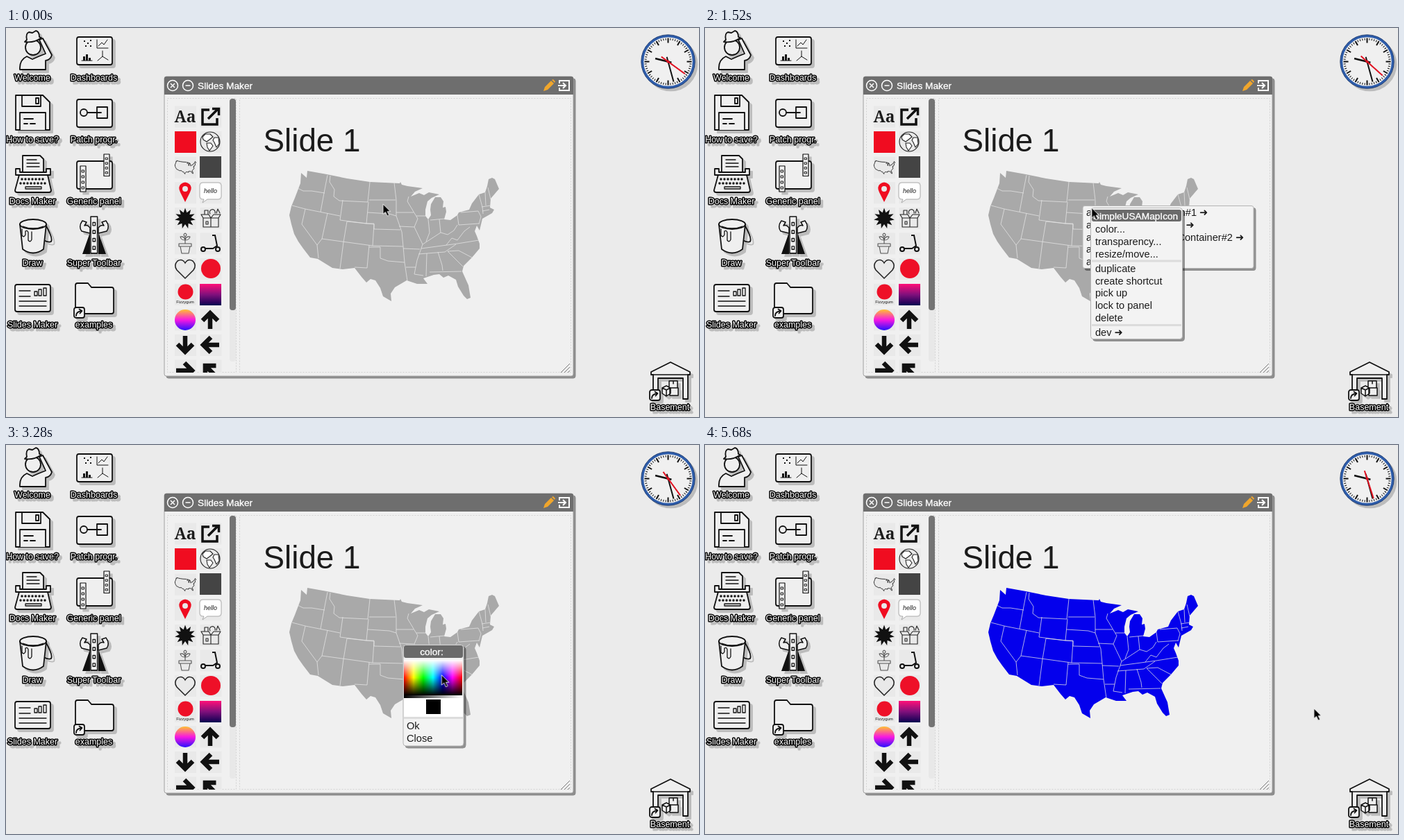
Recreate the animation shown at these times as an HTML page. Size 998x561 px, loop 5760 ms.

```html
<!DOCTYPE html>
<html lang="en">
<head>
<meta charset="utf-8">
<title>Slides Maker</title>
<style>
html, body { margin: 0; width: 100%; height: 100%; overflow: hidden; background: #ebebeb; }
svg { display: block; width: 998px; height: 561px; font-family: "Liberation Sans", Arial, sans-serif; }
text { fill: #1b1b1b; white-space: pre; }
.shadow { filter: drop-shadow(4px 4px 0 #0003); }
.pop { filter: drop-shadow(3.5px 3.5px 0 #0006); }
.ink { fill: #efefef; stroke: #111; stroke-width: 1.8; stroke-linejoin: round; stroke-linecap: round; }
.thin { fill: none; stroke: #222; stroke-width: 1.1; stroke-linejoin: round; stroke-linecap: round; }
.solid { fill: #111; stroke: none; }
.line { fill: none; }
.label { font-size: 12.5px; text-anchor: middle; fill: #fff; stroke: #000; stroke-width: 3px; paint-order: stroke; stroke-linejoin: round; }
.head { font-size: 13.7px; fill: #fff; stroke: #fff; stroke-width: .35px; }
.item { font-size: 14.6px; }
.arrow { fill: none; stroke: #111; stroke-width: 6.5; }
.dots { fill: none; stroke: #d2d2d2; stroke-dasharray: 2 2; }
.box { fill: #f3f3f3; stroke: #b4b4b4; }

.states, .list, .hover1, .props, .hover2, .picker, .picked, .hover3, .press, .ring, .second {
  animation: 5.76s step-end infinite;
}
.cursor { animation: move 5.76s ease-in-out infinite; }
.list { animation-name: list; }
.hover1 { animation-name: hover1; }
.props { animation-name: props; }
.hover2 { animation-name: hover2; }
.picker { animation-name: picker; }
.picked { animation-name: picked; }
.hover3 { animation-name: hover3; }
.press { animation-name: press; }
.ring { animation-name: ring; }
.states { animation-name: paint; }
.second { animation-name: tick; }

@keyframes list { 0%, 43.05%, 100% { opacity: 0 } 6.94% { opacity: 1 } }
@keyframes hover1 { 0%, 26.38%, 100% { opacity: 0 } 15.27% { opacity: 1 } }
@keyframes props { 0%, 43.05%, 100% { opacity: 0 } 22.22% { opacity: 1 } }
@keyframes hover2 { 0%, 43.05%, 100% { opacity: 0 } 36.11% { opacity: 1 } }
@keyframes picker { 0%, 86.11%, 100% { opacity: 0 } 43.05% { opacity: 1 } }
@keyframes picked { 0% { fill: #000 } 62.5%, 100% { fill: #0400ec } }
@keyframes hover3 { 0%, 86.11%, 100% { opacity: 0 } 77.77% { opacity: 1 } }
@keyframes press { 0%, 86.11%, 100% { opacity: 0 } 81.94% { opacity: 1 } }
@keyframes paint { 0% { fill: #a9a9a9 } 86.11%, 100% { fill: #0400ec } }
@keyframes ring {
  0%, 8.33%, 23.61%, 43.05%, 65.27%, 87.5%, 100% { opacity: 0 }
  4.16%, 19.44%, 38.88%, 61.11%, 83.33% { opacity: 1 }
}
@keyframes move {
  0%, 11.11% { transform: translate(543px, 254px) }
  18.05%, 25% { transform: translate(556px, 258px) }
  31.94%, 33.34% { transform: translate(567px, 275px) }
  37.5%, 47.22% { transform: translate(573px, 286px) }
  58.33%, 70.83% { transform: translate(629px, 333px) }
  79.16%, 88.88% { transform: translate(610px, 399px) }
  97.22%, 100% { transform: translate(877px, 380px) }
}
@keyframes tick {
  0% { transform: rotate(126deg) }
  11.46% { transform: rotate(132deg) }
  28.82% { transform: rotate(138deg) }
  46.18% { transform: rotate(144deg) }
  63.54% { transform: rotate(150deg) }
  80.9% { transform: rotate(156deg) }
  98.26%, 100% { transform: rotate(162deg) }
}
</style>
</head>
<body>
<svg viewBox="0 0 998 561">
<defs>
  <path id="land" d="M434 206L433 216L425 209L424 224L416 245L411 257L408 270L411 283L415 297L421 308L428 318L438 331L449 333L470 346L485 348L502 346L512 359L519 367L525 362L532 364L539 375L543 387L555 394L554 383L560 374L577 364L592 369L607 369L601 361L616 356L624 355L630 360L637 357L648 363L651 373L659 386L664 391L669 389L666 371L657 351L659 343L671 331L682 318L682 311L678 300L675 293L678 285L682 292L686 275L700 267L703 262L697 259L698 246L710 232L704 218L700 216L695 218L693 228L690 237L681 240L671 253L667 262L652 266L650 270L640 277L631 276L634 265L633 258L629 259L630 250L626 244L618 244L612 254L611 262L612 270L608 276L604 271L604 262L607 250L613 245L624 240L609 237L602 241L595 238L583 243L589 236L600 231L578 228L570 226L568 222L567 224L524 222L491 217L462 211Z"/>
  <linearGradient id="hue"></linearGradient>
  <linearGradient id="light" x2="0" y2="1">
    <stop stop-color="#fff"/><stop offset=".5" stop-color="#fff" stop-opacity="0"/>
    <stop offset=".5" stop-color="#000" stop-opacity="0"/><stop offset="1"/>
  </linearGradient>
  <linearGradient id="gray"><stop/><stop offset="1" stop-color="#fff"/></linearGradient>
  <linearGradient id="dusk" x2="0" y2="1"><stop stop-color="#ff0f78"/><stop offset=".5" stop-color="#80107c"/><stop offset="1" stop-color="#0a0050"/></linearGradient>
  <linearGradient id="dawn" x2="0" y2="1"><stop stop-color="#ffc030"/><stop offset=".5" stop-color="#f818e0"/><stop offset="1" stop-color="#2810ff"/></linearGradient>
  <clipPath id="tools"><path d="M232 101H336V497H232Z"/></clipPath>
  <g id="badge"><rect width="15" height="15" rx="3" class="ink"/><path class="ink line" d="M3 12Q3 6 11 5M7.500 2.500L11.500 5L8.500 8.500"/></g>
  <g id="strip"><rect width="8" height="37" class="ink" style="stroke-width:1.2"/><path class="ink line" style="stroke-width:1" d="M2.500 6h3v3h-3zM2.500 14h3v3h-3zM2.500 22h3v3h-3zM2.500 30h3v3h-3z"/></g>
</defs>
<rect width="998" height="561" fill="#ebebeb"/>

<g class="ink">
  <g class="shadow">
    <path d="M20 60Q19 46 30 41L38 45L47 41L57 37L48 17L53 15L66 39Q64 46 57 47V60Z"/>
    <circle cx="39" cy="28" r="11"/>
    <path d="M30 17Q28 8 33 6L38 7L43 4Q48 5 48 13L51 14Q40 22 27 20Z"/>
  </g>
  <g class="shadow">
    <rect x="102" y="13" width="51" height="40" rx="3"/>
    <path class="line" style="stroke-width:1" d="M131 17V29H147M133 26L138 21L141 24L146 17M109 47H124M139 33V41L132 47M139 41L147 46"/>
    <path class="solid" d="M111 41h3v6h-3zM115 38h3v9h-3zM119 43h3v4h-3zM112 18h2v2h-2zM117 21h2v2h-2zM121 17h2v2h-2zM114 25h2v2h-2zM121 25h2v2h-2z"/>
  </g>
  <g class="shadow">
    <path d="M14 97H53L63 107V147H14Z"/>
    <path d="M23 97H50V113H23ZM43 101H47V109H43ZM20 147V122H57V147"/><path class="line" d="M26 131H39M26 138H31M35 138H42"/>
  </g>
  <g class="shadow">
    <rect x="102" y="103" width="51" height="40" rx="3"/>
    <circle cx="112" cy="122" r="5"/><path d="M131 114H146V130H131ZM117 122H137"/>
  </g>
  <g class="shadow">
    <path d="M24 184H49L54 189V210H24Z"/>
    <path class="line" stroke-width="1.300" d="M30 190H44M30 195H48M30 200H48"/>
    <path d="M14 203H20V208H58V203H64V212H14ZM19 212H60L65 234Q65 237 62 237H16Q13 237 13 234Z"/>
    <path class="line" stroke-dasharray="0 5" stroke-width="3.400" d="M23 218H58M21 224H60"/><path stroke-width="1.300" d="M28 229H51V232H28Z"/>
  </g>
  <g class="shadow">
    <rect x="102" y="192" width="51" height="40" rx="3"/>
    <use href="#strip" x="107" y="199"/><use href="#strip" transform="translate(141 182) scale(1 .85)"/>
  </g>
  <g class="shadow">
    <path class="line" d="M57 284Q68 303 65 308Q59 311 40 297"/>
    <path d="M20 283L24 319Q39 330 54 319L58 283Z"/><ellipse cx="39" cy="283" rx="19" ry="7"/>
    <path class="line" stroke-width="1.300" d="M24 286Q39 292 54 286M23 290V299Q26 303 28 298V293Q31 291 32 295V306Q35 310 37 305V294"/>
  </g>
  <g class="shadow">
    <path class="solid" d="M121 295L110 326H121ZM133 295L144 326H133Z"/>
    <path stroke-width="1.500" d="M121 296L109 293Q104 286 110 278L116 280L113 285Q117 283 121 288ZM133 296L145 293Q150 286 144 278L138 280L141 285Q137 283 133 288Z"/>
    <use href="#strip" transform="translate(122 272) scale(1.200 1.430)"/>
  </g>
  <g class="shadow">
    <rect x="13" y="370" width="51" height="39" rx="3"/>
    <path class="line" stroke-width="1.300" d="M19 379H35M19 387H35M19 394H58M19 401H58M41 380h4v6h-4zM47 377h4v9h-4zM54 375h4v11h-4z"/>
  </g>
  <g class="shadow">
    <path d="M100 412V371Q100 368 103 368H118L123 374H152Q155 374 155 377V409Q155 412 152 412Z"/><use href="#badge" x="98" y="403"/>
  </g>
  <g class="shadow">
    <path d="M932 535V500H929V496L957 482L985 496V500H982V535H975V505H939V535Z"/>
    <path stroke-width="1.500" d="M932 500H982M955 509h12v10h-12zM961 509v4M956 519h12v11h-12zM945 519l6-3 6 3v8l-6 4-6-4zM945 519l6 3 6-3M951 522v9"/><use href="#badge" x="927" y="522"/>
  </g>
</g>
<g id="labels"></g>

<g transform="translate(953.500 48.500)">
  <g class="shadow"><circle r="37" fill="#f0f0f0" stroke="#2d5caa" stroke-width="3.500"/></g>
  <circle r="38.800" fill="none" stroke="#1c3565" stroke-width=".8"/>
  <g id="ticks" stroke="#111"></g>
  <path stroke="#111" stroke-width="2.500" transform="rotate(283.700)" d="M0 5V-19"/>
  <path stroke="#111" stroke-width="2" transform="rotate(164.600)" d="M0 7V-30"/>
  <g class="second"><path stroke="#e01020" stroke-width="2" d="M0 12V-30"/><circle r="2" fill="#e01020"/></g>
</g>

<g class="pop"><rect x="228" y="70" width="589" height="432" rx="3" fill="#f0f0f0" stroke="#a0a0a0"/></g>
<path d="M228 96V73Q228 70 231 70H814Q817 70 817 73V96Z" fill="#6e6e6e"/>
<g fill="none" stroke="#fff" stroke-width="1.500">
  <circle cx="240" cy="83" r="7.500"/><circle cx="262" cy="83" r="7.500"/>
  <path d="M237 80L243 86M243 80L237 86M258.500 83H265.500"/>
  <path stroke-width="2" d="M797 80V76H811V90H797V86M795 83H806M802 79L806 83L802 87"/>
</g>
<path fill="#f0a62c" d="M774 91L776 85L785 76L789 80L780 89ZM786 75L788 74L791 77L790 79Z"/>
<text class="head" x="276" y="88">Slides Maker</text>
<path class="dots" d="M232.500 101.500H331.500V496.500H232.500ZM336.500 101.500H813.500V496.500H336.500Z"/>
<rect x="322" y="102" width="9" height="379" rx="4" fill="#e8e8e8"/>
<rect x="322" y="102" width="9" height="305" rx="4" fill="#747474"/>
<path stroke="#777" d="M799 497L812 484M804 497L812 489M809 497L812 494"/>

<g clip-path="url(#tools)">
  <g id="cells" fill="#e9e9e9"></g>
  <text x="258" y="136" font-size="23" font-weight="700" text-anchor="middle" font-family="Noto Serif, serif">Aa</text>
  <path fill="none" stroke="#111" stroke-width="3.500" d="M293 118H283V139H304V130M291 131L305 117M297 116.500H306.500V126"/>
  <rect x="243" y="149" width="31" height="31" fill="#f00c20"/>
  <g class="thin">
    <circle cx="294" cy="164" r="14"/>
    <path fill="#fff" d="M283 157L287 153L294 153L298 157L293 161L289 164L284 161ZM289 166L295 166L298 170L293 177L290 172ZM300 158L306 158L307 167L303 172L300 165L298 162Z"/>
    <use href="#land" transform="translate(202.500 171) scale(.1)" stroke-width="9"/>
  </g>
  <rect x="279" y="185" width="31" height="31" fill="#444"/>
  <path fill="#f00c20" fill-rule="evenodd" d="M258 251L251 237Q247 229 252 225Q258 220 264 225Q269 229 265 237ZM258 228A4 4 0 1 0 258 236A4 4 0 1 0 258 228Z"/>
  <path fill="#fff" stroke="#aaa" d="M283 223H306Q310 223 310 227V243Q310 247 306 247H290L283 252L285 247H283Q279 247 279 243V227Q279 223 283 223Z"/>
  <text x="294.500" y="238" font-size="9" font-style="italic" text-anchor="middle">hello</text>
  <polygon id="burst" fill="#111"/>
  <g class="thin">
    <path d="M284 274H306V287H284ZM284 274L281 269H292L295 274L299 269H309L306 274M295 274V287M286 268V263H291V268M294 268A4 4 0 1 1 301 267M303 267L305 261L308 267M288 279H291V283H288Z"/>
    <path stroke="#555" d="M249 311H267V315H249ZM251 315L253 325H263L265 315M258 311V301M258 306Q252 306 251 301Q257 300 258 306Q259 300 265 301Q264 306 258 306M258 301Q254 298 258 296Q262 298 258 301"/>
  </g>
  <g fill="none" stroke="#111" stroke-width="2"><circle cx="284" cy="319" r="3"/><circle cx="305" cy="319" r="3"/><path d="M287 318H298L304 314L301 299H297"/></g>
  <path fill="none" stroke="#222" stroke-width="1.500" d="M258 361L246 349Q241 342 247 336Q254 332 258 339Q262 332 269 336Q275 342 270 349Z"/>
  <circle cx="295" cy="347" r="14" fill="#ee1028"/>
  <circle cx="258.500" cy="380.500" r="11" fill="#ee1028"/>
  <text x="258" y="397" font-size="6" text-anchor="middle">Fizzygum</text>
  <rect x="279" y="369" width="31" height="31" fill="url(#dusk)"/>
  <circle cx="258" cy="421" r="15" fill="url(#dawn)"/>
  <g id="arrows"></g>
</g>

<text x="370.500" y="178" font-size="45.800">Slide 1</text>
<use href="#land" class="states"/>
<g fill="none" stroke="#e6e6e6" stroke-width=".75">
  <path d="M420 231L428 235L440 235L459 238M463 212L458 238L453 265M412 256L431 261L481 271M467 213L466 222L473 233L472 243L480 249L521 251L524 222M485 248L481 277L519 282L522 251M431 261L426 283L448 313L450 332M463 267L455 304L528 314L530 283L491 279L486 309L481 347M455 304L448 313M519 282H530V290L568 291M523 313L520 346L502 345M523 316H539V332L550 336L574 338M528 314L572 315M523 248H561M521 266L552 268L562 271"/>
  <path d="M559 223L562 248V271L570 294L572 315L574 338L578 365M562 266H587M580 243L578 250L593 275L588 287L600 312L592 335L590 345L588 355L601 357M566 286L588 287M572 318L596 319M576 345H590M591 271H604M608 276L610 295L605 308M624 276L626 295M600 312L626 295L636 298L645 292L650 284M650 270L652 284"/>
  <path d="M598 318L650 311L681 306M594 326L632 323L648 312M606 325L605 358M622 323L628 342L629 350M610 352L656 351M636 322L658 344M636 322L652 321L671 331M634 313L642 303L650 306L660 293L668 287M652 284L681 282M655 266L680 264L684 272L681 283M681 240L686 258L687 268M690 237L691 256M685 258L698 256M686 264L696 262M694 230L698 247M611 277L632 275"/>
</g>

<g class="list">
  <g class="pop"><rect class="box" x="544" y="256.500" width="246" height="90" rx="3"/></g>
  <rect class="hover1" x="545" y="257" width="244" height="17" fill="#a9a9a9"/>
  <g id="listItems"></g>
</g>
<rect class="hover1" x="407" y="193" width="305" height="215" fill="#00f" fill-opacity=".55"/>

<g class="props">
  <g class="pop"><rect class="box" x="555.500" y="259.500" width="132" height="189" rx="4"/></g>
  <rect x="557" y="262" width="129" height="17" rx="3" fill="#6a6a6a"/>
  <text class="head" x="620" y="275.500" text-anchor="middle">SimpleUSAMapIcon</text>
  <rect class="hover2" x="557" y="282" width="129" height="17" fill="#a9a9a9"/>
  <path stroke="#dcdcdc" stroke-width="3" d="M557 336H686M557 428.500H686"/>
  <g id="propItems"></g>
</g>

<g class="picker">
  <g class="pop"><rect class="box" x="572" y="288" width="87" height="146" rx="4"/></g>
  <rect x="573" y="289" width="85" height="18" rx="3" fill="#6a6a6a"/>
  <text class="head" x="613" y="302.500" text-anchor="middle">color:</text>
  <rect x="573" y="310" width="84" height="51" fill="url(#hue)"/>
  <rect x="573" y="310" width="84" height="51" fill="url(#light)"/>
  <rect x="573" y="361" width="84" height="4" fill="url(#gray)"/>
  <rect x="573" y="365" width="85" height="27" fill="#fff"/>
  <rect class="picked" x="605" y="367" width="21" height="21"/>
  <path stroke="#dcdcdc" stroke-width="3" d="M573 393.500H658"/>
  <rect class="hover3" x="573" y="396" width="84" height="17" fill="#a9a9a9"/>
  <rect class="press" x="573" y="396" width="84" height="17" fill="#6e6e6e"/>
  <g id="pickItems"></g>
</g>

<g class="cursor">
  <g class="ring" fill="none"><circle r="22" stroke="#fff" stroke-width="4"/><circle r="22" stroke="#111" stroke-width="2"/></g>
  <path stroke="#fff" transform="scale(.88)" d="M0 0V16.500L4 13L7 19.500L10 18L7 12H12Z"/>
</g>
</svg>
<script>
const $ = id => document.getElementById(id);
const fill = (id, parts) => { $(id).innerHTML = parts.join(""); };
const range = n => [...Array(n).keys()];

const rows = (id, x, items) => fill(id, items.map(([label, y]) => {
  const text = label.replace("➜", '<tspan font-family="DejaVu Sans, sans-serif">➜</tspan>');
  return `<text class="item" x="${x}" y="${y}">${text}</text>`;
}));

const names = [
  ["Welcome", "Dashboards"], ["How to save?", "Patch progr."], ["Docs Maker", "Generic panel"],
  ["Draw", "Super Toolbar"], ["Slides Maker", "examples"]
];
const label = (s, x, y) => `<g class="shadow"><text class="label" x="${x}" y="${y}">${s}</text></g>`;
fill("labels", [
  ...names.flatMap((pair, r) => pair.map((s, c) => label(s, 38 + c * 88.5, 76 + r * 89))),
  label("Basement", 956, 551)
]);

fill("ticks", range(60).map(i => {
  const hour = i % 5 === 0;
  return `<path transform="rotate(${i * 6})" stroke-width="${hour ? 2 : 1}" d="M0-34V${hour ? -27 : -31}"/>`;
}));

fill("cells", range(22).map(i =>
  `<rect x="${243 + i % 2 * 36.5}" y="${112.5 + (i >> 1) * 36.6}" width="31" height="31"/>`));

fill("arrows", [[294, 421, 0], [258, 457, 180], [294, 457, -90], [258, 494, 90], [294, 494, -45]].map(([x, y, a]) =>
  `<path class="arrow" transform="translate(${x} ${y}) rotate(${a})" d="M0 13V-9M-11 1L0-10L11 1"/>`));

$("burst").setAttribute("points", range(22).map(i => {
  const r = i % 2 ? 8.5 : 15, a = i * Math.PI / 11;
  return [258 + r * Math.sin(a), 274.5 - r * Math.cos(a)].map(v => v.toFixed(1));
}).join(" "));

fill("hue", range(7).map(i => `<stop offset="${i / 6}" stop-color="hsl(${i * 60},100%,50%)"/>`));

rows("listItems", 549, [
  "SimpleUSAMapIcon#1", "StretchablePanel#2", "StretchableWidgetContainer#2", "SimpleSlide#2", "Window#16"
].map((s, i) => [`a ${s} ➜`, 271 + i * 17.8]));
rows("propItems", 562, [
  ["color...", 295], ["transparency...", 313], ["resize/move...", 331], ["duplicate", 351.5],
  ["create shortcut", 369.5], ["pick up", 387], ["lock to panel", 405], ["delete", 423], ["dev ➜", 443.5]
]);
rows("pickItems", 577, [["Ok", 410], ["Close", 428]]);
</script>
</body>
</html>
```
